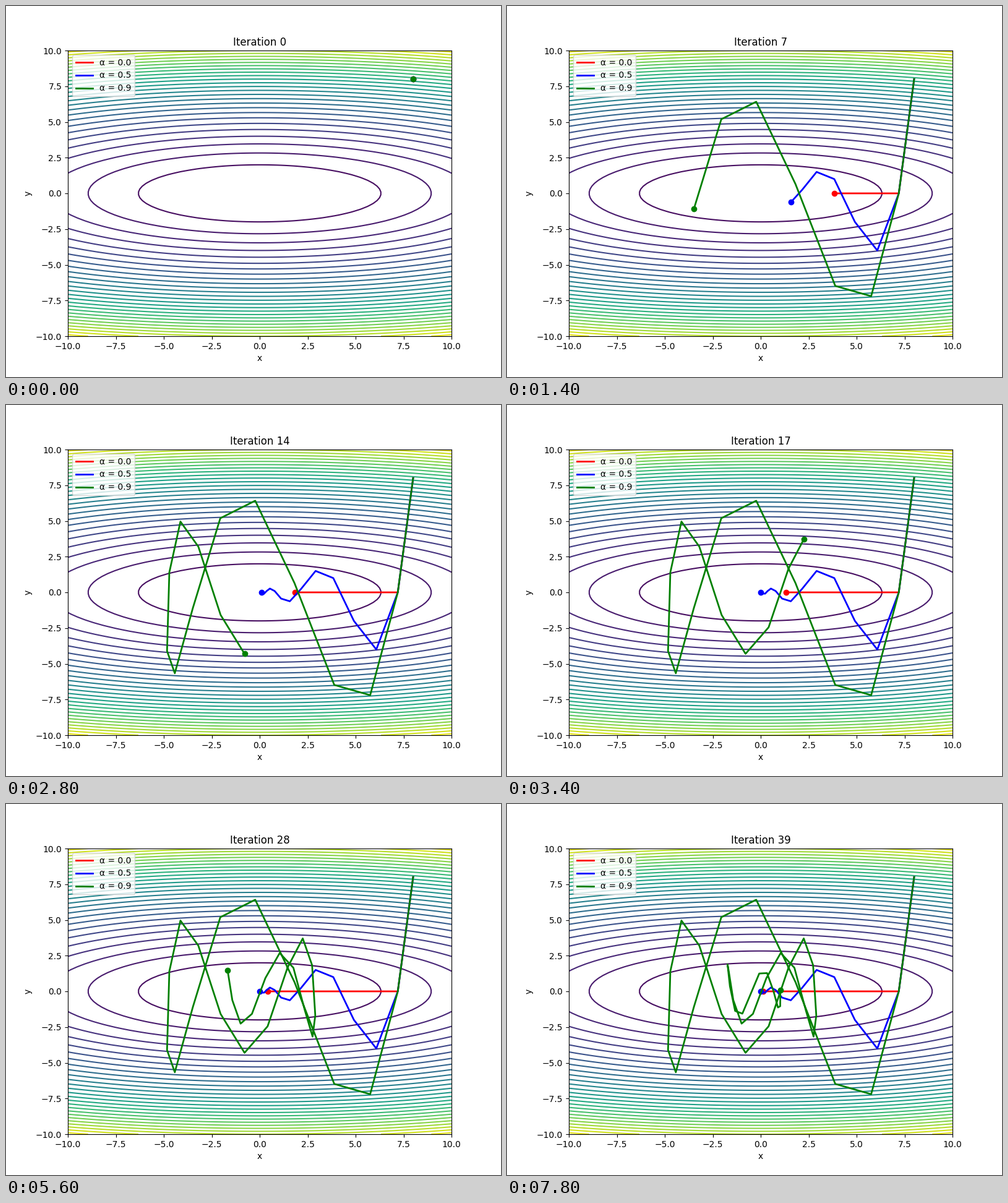
A matplotlib script for the animation above (8 s loop, 800 by 600 pixels).

```python
import numpy as np
import matplotlib.pyplot as plt
from matplotlib.animation import FuncAnimation

STEPS = 40
RATE = 0.5
START = (8.0, 8.0)
CURVATURE = np.array([0.2, 2.0])  # gradient of 0.1 x^2 + y^2
RUNS = [(0.0, "red"), (0.5, "blue"), (0.9, "green")]


def descend(alpha):
    """Positions of gradient descent with momentum alpha."""
    pos = np.array(START)
    vel = np.zeros(2)
    path = [pos]
    for _ in range(STEPS - 1):
        vel = alpha * vel - RATE * CURVATURE * pos
        pos = pos + vel
        path.append(pos)
    return np.array(path)


fig, ax = plt.subplots(figsize=(8, 6), dpi=100)
grid = np.linspace(-10, 10, 100)
X, Y = np.meshgrid(grid, grid)
ax.contour(X, Y, 0.1 * X**2 + Y**2, levels=30, cmap="viridis")
ax.set(xlim=(-10, 10), ylim=(-10, 10), xlabel="x", ylabel="y")
title = ax.set_title("Iteration 0")

tracks = []
for alpha, color in RUNS:
    line, = ax.plot([], [], color=color, lw=2, label=f"α = {alpha}")
    dot, = ax.plot([], [], "o", color=color)
    tracks.append((descend(alpha), line, dot))
ax.legend(loc="upper left")


def update(i):
    for path, line, dot in tracks:
        line.set_data(path[:i + 1, 0], path[:i + 1, 1])
        dot.set_data(path[i:i + 1, 0], path[i:i + 1, 1])
    title.set_text(f"Iteration {i}")


anim = FuncAnimation(fig, update, frames=STEPS, init_func=lambda: update(0),
                     interval=200, repeat=True, repeat_delay=0)
plt.show()
```
